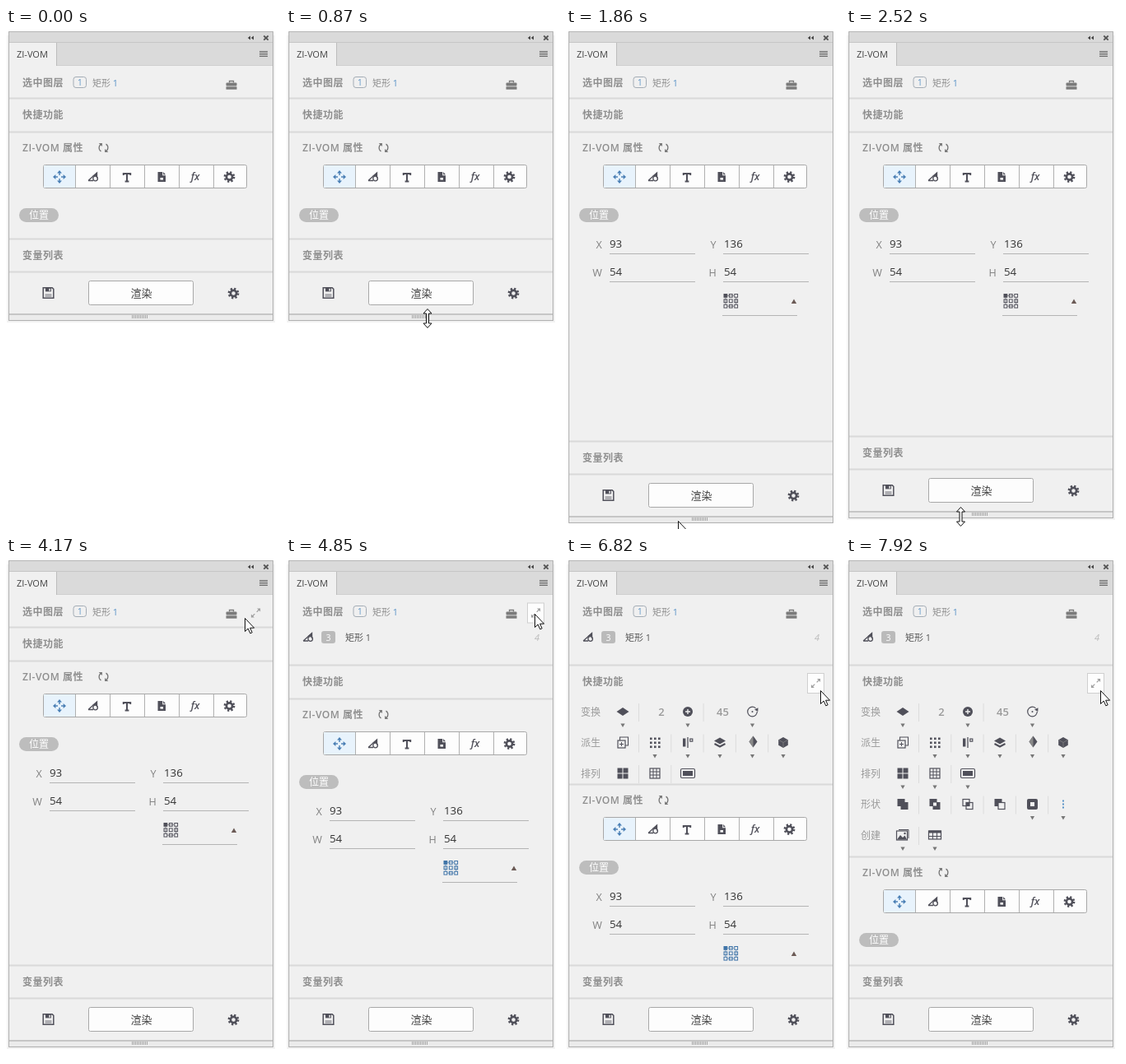
An HTML page for the animation above (8 s loop, 333 by 609 pixels).

```html
<!DOCTYPE html>
<html lang="zh">
<head>
<meta charset="utf-8">
<style>
html, body { margin: 0; width: 100%; height: 100%; overflow: hidden; background: #fff; }
svg { display: block; width: 333px; height: 609px; }
text { font-family: "Open Sans", "Noto Sans CJK SC", "Noto Sans CJK JP", sans-serif; white-space: pre; }
</style>
</head>
<body>
<svg id="stage" viewBox="0 0 333 609" xmlns="http://www.w3.org/2000/svg"></svg>
<script>
const LOOP = 8000;
const BG = '#f0f0f0', DARK = '#50505a', HEAD = '#8e8e8e', BLUE = '#5b94c8';

// ---- markup helpers ----
const rect = (x, y, w, h, fill, more = '') =>
  `<rect x="${x}" y="${y}" width="${w}" height="${h}" fill="${fill}" ${more}/>`;
const path = (d, fill, more = '') => `<path d="${d}" fill="${fill}" ${more}/>`;
const line = (d, color = DARK, width = 1, more = '') =>
  path(d, 'none', `stroke="${color}" stroke-width="${width}" ${more}`);
const text = (x, y, s, size, fill, more = '') =>
  `<text x="${x}" y="${y}" font-size="${size}" fill="${fill}" ${more}>${s}</text>`;
const group = (x, y, body, id = '') =>
  `<g ${id && `id="${id}"`} transform="translate(${x} ${y})">${body}</g>`;
const heading = (y, s) => text(20, y, s, 12, HEAD, 'font-weight="600" letter-spacing=".5"');
const divider = y => rect(4, y, 320, 2, '#d9d9d9');
const each = (n, f) => Array.from({ length: n }, (_, i) => f(i)).join('');
const mid = 'text-anchor="middle"';

// ---- icons, centred on 0,0 ----
const gear = `<circle r="5.4" fill="none" stroke="${DARK}" stroke-width="3" stroke-dasharray="2.12"/>
  <circle r="3.6" fill="none" stroke="${DARK}" stroke-width="2.6"/>`;
const pen = line('M-6 4.5L4.5 -5V1.5M-6 4.5H0', DARK, 1.3) +
  `<circle cx="2.6" cy="2" r="2.8" fill="none" stroke="${DARK}" stroke-width="1.3"/>` +
  path('M-1 -1L4.8 -5.5V-1Z', DARK);
const refresh = line('M-3 4.4A5 5 0 0 1 -2.5 -4.4M3 -4.4A5 5 0 0 1 2.5 4.4', '#777', 1.3) +
  path('M-5.8 -5.6H-1.6V-1.4ZM5.8 5.6H1.6V1.4Z', '#777');
const move = each(4, i => `<g transform="rotate(${i * 90})">` +
  path('M0 -8L3 -4.6H-3Z', '#4a7fb5') + line('M0 -5V-2', '#4a7fb5', 1.4) + '</g>');
const doc = path('M-4.5 -6H1.2V-1.8H5V6H-4.5ZM2.2 -6L5 -2.8H2.2Z', DARK) + rect(-1.5, 1, 3.5, 2.6, '#fff');
const floppy = line('M-6.3 -6.3H4.6L6.3 -4.6V6.3H-6.3Z', DARK, 1.5) +
  rect(-3.6, -6, 7, 4.4, DARK) + rect(0.8, -5.2, 1.5, 2.8, BG) + line('M-4 2H4M-4 4H4', DARK, .8);
const briefcase = rect(-6.5, -3, 13, 4, '#7b7b7b', 'rx="1"') + rect(-6.5, 1.8, 13, 3.4, '#7b7b7b') +
  line('M-2.5 -3V-5H2.5V-3', '#7b7b7b', 1.3);
const expand = color => line('M1.2 -1.2L5 -5M-1.2 1.2L-5 5', color, 1.2) +
  path('M1.6 -5.6H5.6V-1.6ZM-1.6 5.6H-5.6V1.6Z', color);
const down = path('M-2.6 -2H2.6L0 2.4Z', '#777');

const hollow = (x, y, w) => rect(x, y, w, w, 'none', `stroke="${DARK}" stroke-width="1.2"`);
const solid = (x, y, w, h = w, fill = DARK) => rect(x, y, w, h, fill);
const sheet = path('M0 -5L7.5 0L0 5L-7.5 0Z', DARK);
const number = s => text(0, 5, s, 13, '#999', mid + ' font-weight="600"');
const plus = `<circle r="6" fill="${DARK}"/>` + line('M-3 0H3M0 -3V3', BG, 1.4);
const rotate = `<circle r="5.8" fill="none" stroke="${DARK}" stroke-width="1.2" stroke-dasharray="31 5"/>` +
  path('M2.5 -2.5L7 -4.8L6.8 0Z', DARK) + `<circle r="1" fill="${DARK}"/>`;
const duplicate = line('M-3.5 -2.5V-6.5H6.5V3.5H3', DARK, 1.1) + hollow(-6, -2.5, 9) + line('M-4 2H1M-1.5 -.5V4.5');
const dots = each(9, i => solid(-6 + i % 3 * 5, -6 + (i / 3 | 0) * 5, 2.6));
const mirror = line('M0 -6.5V6.5', DARK, 1.3) + solid(-6, -5, 3.4, 10) + hollow(2.8, -4.4, 3);
const layers = path('M0 -6L7 -2L0 2L-7 -2Z', DARK) + line('M-6.5 1.5L0 5L6.5 1.5', DARK, 2);
const gem = path('M1 -8L6 -1L1 6L-4 -1Z', DARK) + path('M1 -8L-4 -1L1 6Z', '#888');
const cube = path('M0 -6.5L5.8 -3.3V3.3L0 6.5L-5.8 3.3V-3.3Z', DARK) + line('M-5 -2.8L0 0L5 -2.8M0 0V6', '#888', .7);
const tiles = each(4, i => solid(-6.5 + i % 2 * 7, -6.5 + (i >> 1) * 7, 6));
const mesh = hollow(-6, -6, 12) + line('M-2 -6V6M2 -6V6M-6 -2H6M-6 2H6');
const bar = rect(-8.5, -5.5, 17, 11, 'none', `rx="1.5" stroke="${DARK}" stroke-width="1.2"`) + solid(-6, -3, 12, 6);
const unite = solid(-6.5, -6.5, 9) + solid(-2.5, -2.5, 9);
const cut = unite + solid(-2, -2, 4, 4, BG);
const meet = hollow(-6, -6, 8) + hollow(-2, -2, 8) + solid(-2, -2, 4);
const minus = solid(-6.5, -6.5, 9) + rect(-2, -2, 8, 8, BG, `stroke="${DARK}" stroke-width="1.2"`);
const frame = rect(-6.5, -6.5, 13, 13, DARK, 'rx="2"') + solid(-2.5, -2.5, 5, 5, BG);
const more = each(3, i => rect(-1, -5 + i * 4, 2, 2, BLUE));
const image = line('M-5 -6.5H7V4', DARK) + rect(-7.5, -5, 13, 11, BG, `stroke="${DARK}" stroke-width="1.2"`) +
  path('M-7 5.5L-3 0L0 3L2.5 .5L5 5.5Z', DARK) + `<circle cx="2.5" cy="-2" r="1.2" fill="${DARK}"/>`;
const table = rect(-7.5, -5, 15, 10, 'none', `stroke="${DARK}" stroke-width="1.2"`) +
  solid(-7.5, -5.5, 15, 3) + line('M-2.5 -5V5M2.5 -5V5M-7 1.5H7');

// ---- quick function rows: label, icons, columns with a menu, separator count ----
const COLS = [69, 108, 148, 187, 226.5, 264];
const rows = [
  ['变换', [sheet, number('2'), plus, number('45'), rotate], [0, 2, 4], [0, 2]],
  ['派生', [duplicate, dots, mirror, layers, gem, cube], [1, 2, 3, 4, 5], [0, 1, 2, 3, 4]],
  ['排列', [tiles, mesh, bar], [0, 1, 2], [0, 1]],
  ['形状', [unite, cut, meet, minus, frame, more], [4, 5], [0, 1, 2, 3, 4]],
  ['创建', [image, table], [0, 1], [0]],
].map(([label, icons, menus, seps], r) => group(0, 142 + r * 37.5,
  text(18, 4.5, label, 12, '#999') +
  icons.map((icon, i) => group(COLS[i] + (r === 0 && (i === 1 || i === 3) ? (i === 1 ? 8 : 3.5) : 0), 0, icon)).join('') +
  menus.map(i => group(COLS[i], 16.5, down)).join('') +
  seps.map(i => rect(88 + i * 39.3, -10, 1, 22, '#dcdcdc')).join(''))).join('');

const field = (lx, x, y, label, value) =>
  text(lx, y + 1, label, 12.5, '#808080', mid) + text(x, y, value, 13.3, '#333') +
  rect(x - (x > 100 ? 1 : 0), y + 7, 104, 1, '#b4b4b4');

const tabs = rect(45.5, 166.5, 247, 28, '#fdfdfd', 'rx="2" stroke="#a8a8a8"') +
  rect(46, 167, 39, 27, '#e8f3fc') +
  [84, 126, 168, 210, 252].map(x => rect(x, 167, 1, 27, '#b0b0b0')).join('') +
  group(65, 181, move) + group(106, 181, pen) +
  line('M142.8 179V177H151.2V179M147 177V186.5M144.6 186.5H149.4', DARK, 2) + group(189, 181, doc) +
  text(230, 185, 'fx', 12.5, DARK, mid + ' font-style="italic" font-weight="600"') + group(271.5, 181, gear);

const cells = each(9, i => rect(192 + i % 3 * 6.4, 323.5 + (i / 3 | 0) * 6.4, 3.8, 3.8,
  i ? 'none' : 'currentColor', 'stroke="currentColor"')) +
  line('M196 325.4H204M196 338.2H204M193.9 328V336M206.7 328V336', 'currentColor', .6);

const layerSection = rect(4, 46, 320, 170, BG) + heading(70.5, '选中图层') +
  rect(82, 59.5, 15.5, 13, BG, 'rx="3" stroke="#a3acb5"') + text(89.8, 70, '1', 10, BLUE, mid) +
  text(105, 71, `矩形 <tspan fill="${BLUE}">1</tspan>`, 11, HEAD) + group(274, 69.5, briefcase) +
  `<g id="layerRow">` + group(27, 97.5, pen) + rect(43, 90, 17, 15, '#bababa', 'rx="3"') +
  text(51.5, 101.5, '3', 10.5, '#fff', mid) + text(72, 102, '矩形 1', 11, '#555') +
  text(302, 101.5, '4', 11, '#bbb', 'font-style="italic"') + '</g>';

const quickSection = rect(4, 85, 320, 250, BG) + divider(84.5) + heading(110, '快捷功能') +
  `<g id="quickRows">${rows}</g>`;

const propSection = rect(4, 126, 320, 480, BG) + divider(125.5) + heading(150, 'ZI-VOM 属性') +
  group(118.5, 145.5, refresh) + tabs + rect(16, 219, 48, 17, '#bdbdbd', 'rx="8.5"') +
  text(40, 232, '位置', 12, '#fff', mid) +
  field(40, 53, 267, 'X', '93') + field(179, 192, 267, 'Y', '136') +
  field(38, 53, 301, 'W', '54') + field(178, 192, 301, 'H', '54') +
  `<g id="anchors">${cells}</g>` + path('M273.8 335H280.2L277 329.6Z', '#6b5a55') + rect(190, 349, 91, 1, '#b4b4b4');

// Drawn relative to the lower edge of the panel
const strip = rect(4, -8, 320, 8, '#ebebeb') + rect(3, -8, 322, 2, '#c6c6c6') +
  line('M153 -4H173', '#a6a6a6', 4, 'stroke-dasharray="1 1"') + rect(3, 0, 322, 1, '#b0b0b0');
const footer = rect(4, -99, 320, 99, BG) + divider(-99.5) + heading(-74.5, '变量列表') + divider(-59.5) +
  group(51.5, -33, floppy) + rect(100.5, -47.5, 127, 29, '#fdfdfd', 'rx="2" stroke="#a8a8a8"') +
  text(164.5, -28, '渲染', 13, '#444', mid) + group(276.5, -32.5, gear) + strip;

const titleBar = rect(3, 4, 322, 42, '#dadada', 'rx="1"') + rect(3, 4, 322, 1, '#b5b5b5') +
  rect(3, 17, 322, 1, '#c6c6c6') + rect(3, 45, 322, 1, '#cfcfcf') + rect(4, 18, 57, 28, BG) +
  rect(61, 18, 1, 28, '#bcbcbc') + text(13, 36, 'ZI-VOM', 11, '#444') +
  path('M297 9.5V14.5L293.8 12ZM301 9.5V14.5L297.8 12Z', '#444') +
  line('M313.3 9.5L318.7 14.7M318.7 9.5L313.3 14.7', '#555', 1.8) +
  each(4, i => rect(308, 28 + i * 2, 10, 1, '#666'));

const arrow = path('M.5 .5V16.5L4.2 13L6.8 18.8L9.2 17.8L6.6 12.2H11.6Z', '#fff', 'stroke="#111"');
const resizer = path('M0 -11.5L5 -6H1.5V6H5L0 11.5L-5 6H-1.5V-6H-5Z', '#fff', 'stroke="#111"');

document.getElementById('stage').innerHTML =
  rect(0, 0, 333, 609, '#fff') + '<rect id="shade" x="1" y="9" width="326" fill="#f2f2f2"/>' +
  layerSection + group(0, 0, quickSection, 'quick') + group(0, 0, propSection, 'props') +
  group(0, 0, footer, 'footer') +
  `<g id="gap">` + '<rect id="gapFill" x="4" width="320" height="260" fill="#fff"/>' +
  '<rect id="corner" x="309" width="15" height="15" fill="#ececec"/></g>' +
  '<rect id="below" x="0" width="333" height="609" fill="#fff"/>' +
  '<rect id="glow" x="1" width="326" height="2" fill="#f2f2f2"/>' +
  group(0, 0, strip, 'edge') + titleBar + '<path id="sides" stroke="#b0b0b0" fill="none"/>' +
  `<g id="hover">` + rect(-10, -12, 20, 24, '#fdfdfd', 'id="button" stroke="#cfcfcf"') + expand('#a0a0a0') + '</g>' +
  group(0, 0, arrow, 'arrow') + group(0, 0, resizer, 'resizer');

const el = {};
document.querySelectorAll('[id]').forEach(e => el[e.id] = e);
const place = (e, x, y) => e.setAttribute('transform', `translate(${x} ${y})`);
const show = (e, on) => e.setAttribute('visibility', on ? 'visible' : 'hidden');

// ---- timeline: values hold until the next key ----
const at = (keys, t) => keys.reduce((found, key) => key[0] <= t ? key : found);
const glide = (t0, t1, steps, [x0, y0], [x1, y1]) => Array.from({ length: steps }, (_, i) => {
  const k = i / (steps - 1), e = k * k * (3 - 2 * k);
  return [t0 + (t1 - t0) * k, Math.round(x0 + (x1 - x0) * e), Math.round(y0 + (y1 - y0) * e)];
});

const windowEnd = [[0, 355], [1320, 436], [1420, 471], [1540, 515], [1650, 560], [1750, 601], [2190, 595]];
const contentEnd = [[0, 355], [1420, 436], [1540, 471], [1650, 515], [1750, 560], [1860, 601], [2310, 595]];
const layerGrow = [[0, 0], [4730, 24], [4850, 46]];
const quickGrow = [[0, 0], [6820, 104], [6940, 192]];
const pressed = [[4510, 4730], [6700, 6820], [7690, 7920]];
const pointer = [
  [0, -50, -50], [220, 282, 488], [330, 232, 420], [440, 174, 343],
  [870, 172, 353, true], [1320, 158, 446], [1420, 142, 485], [1540, 139, 530], [1650, 137, 568],
  [1750, 136, 594], [1860, 136, 599], [2190, 137, 592], [2310, 139, 590], [2520, 139.5, 594, true],
  ...glide(2740, 3510, 8, [138, 585], [87, 212]),
  [3630, 92, 207], [3740, 120, 186], [3850, 165, 155], [3960, 215, 120], [4070, 262, 92],
  [4170, 290, 74], [4290, 302, 69],
  [5610, 303, 85], [5720, 306, 125], [5840, 309, 155], [5950, 309, 162],
];

function draw(t) {
  const [, bottom] = at(windowEnd, t), [, end] = at(contentEnd, t);
  const [, grow] = at(layerGrow, t), [, open] = at(quickGrow, t);
  const [, x, y, resizing] = at(pointer, t);
  const active = t < 1320 || t >= 2520;

  show(el.shade, active);
  show(el.glow, active);
  el.shade.setAttribute('height', bottom - 8);
  el.glow.setAttribute('y', bottom + 1);
  el.below.setAttribute('y', bottom + 1);
  place(el.quick, 0, grow);
  place(el.props, 0, grow + open);
  place(el.footer, 0, end);
  place(el.edge, 0, bottom);
  show(el.layerRow, grow > 0);
  show(el.quickRows, open > 0);
  show(el.gap, bottom > end);
  el.gapFill.setAttribute('y', end + 1);
  el.corner.setAttribute('y', bottom - 23);
  el.sides.setAttribute('d', `M3.5 5V${bottom}M324.5 5V${bottom}`);
  el.anchors.setAttribute('color', grow === 46 ? '#3f74a8' : DARK);

  const center = y < 85 + grow ? 68 : y < 126 + grow + open ? 107.5 + grow : 147.5 + grow + open;
  const onButton = x >= 293 && Math.abs(y - center) <= 12;
  const down = pressed.some(([a, b]) => t >= a && t < b);
  show(el.hover, t >= 2740 && y < end - 99);
  el.button.setAttribute('display', onButton ? 'inline' : 'none');
  el.button.setAttribute('fill', down ? '#e3e3e3' : '#fdfdfd');
  place(el.hover, 303.5, center);

  show(el.arrow, !resizing);
  show(el.resizer, resizing);
  place(el.arrow, x, y);
  place(el.resizer, x, y);
}

const start = performance.now();
function tick() {
  draw((performance.now() - start) % LOOP);
  requestAnimationFrame(tick);
}
tick();
</script>
</body>
</html>
```
